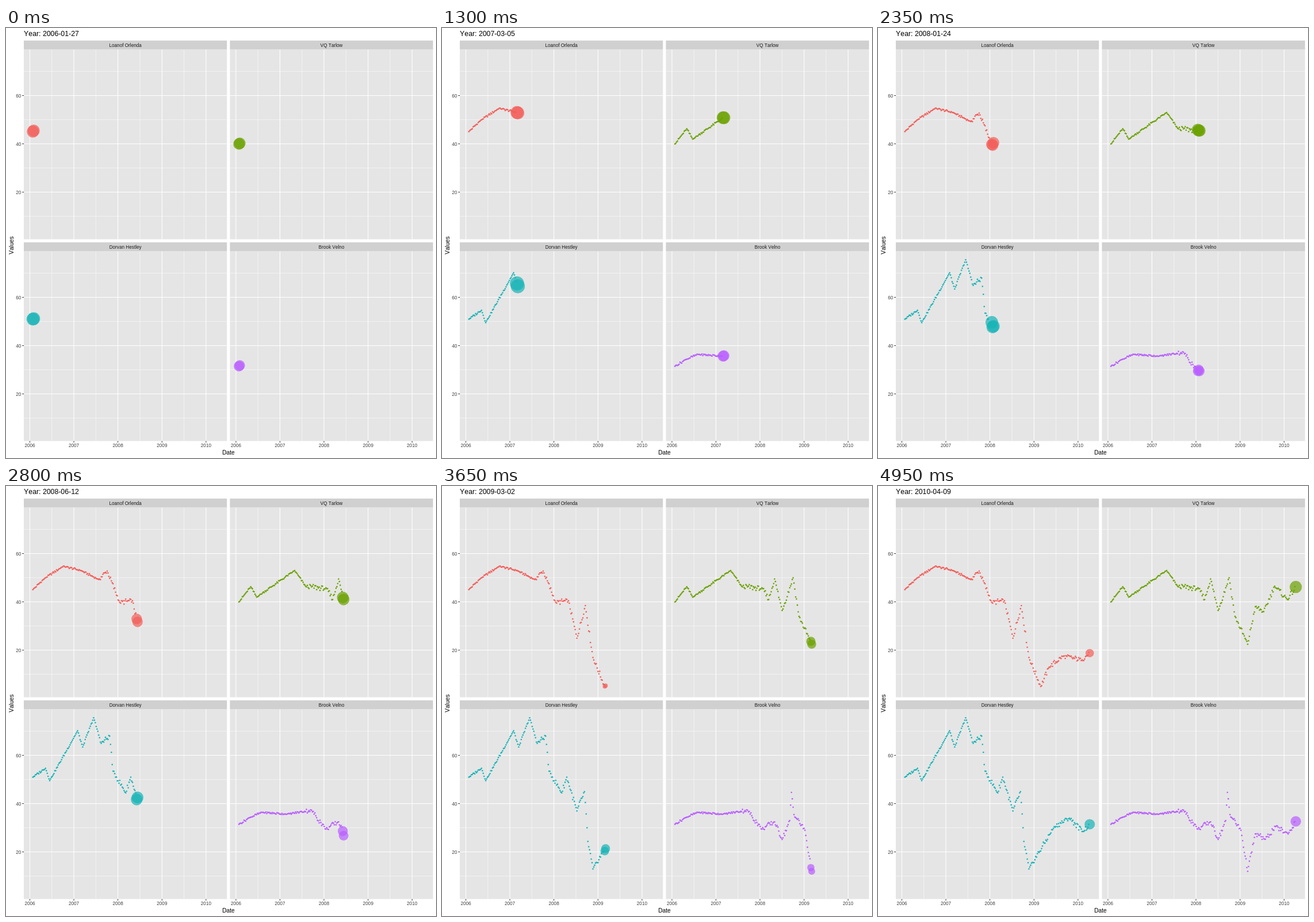
An HTML page for the animation above (5000 ms loop, 748 by 748 pixels).

```html
<!DOCTYPE html>
<html lang="en">
<head>
<meta charset="utf-8">
<title>Weekly values</title>
<style>
  html, body { margin: 0; width: 100%; height: 100%; overflow: hidden; background: #fff; }
  svg { display: block; width: 748px; height: 748px; }
  text { font: 8.2px "Liberation Sans", Arial, sans-serif; font-kerning: none; fill: #404040; }
  .title { font-size: 12.3px; fill: #000; }
  .axis { font-size: 10.25px; fill: #000; }
  .strip { fill: #1a1a1a; }
  .mid { text-anchor: middle; }
  .end { text-anchor: end; }
</style>
</head>
<body>
<svg id="chart" viewBox="0 0 748 748"></svg>
<script>
const FRAMES = 100, STEP = 50, WEEKS = 219, DAYS = 1533;
const START = Date.UTC(2006, 0, 27), DAY = 864e5;
const PX_DAY = 0.20974, COL = 358.5, ROW = 351;
const LOW = 4, HIGH = 75.6;
const chart = document.getElementById('chart');
const points = [];

function add(tag, attrs, text) {
  const el = document.createElementNS('http://www.w3.org/2000/svg', tag);
  for (const key in attrs) el.setAttribute(key, attrs[key]);
  if (text) el.textContent = text;
  return chart.appendChild(el);
}
const rect = (x, y, width, height, fill) => add('rect', { x, y, width, height, fill });
const line = (x1, y1, x2, y2, stroke, w) =>
  add('line', { x1, y1, x2, y2, stroke, 'stroke-width': w });
const label = (x, y, text, cls) => add('text', { x, y, class: cls }, text);

const dayX = day => 46.95 + day * PX_DAY;
const yearX = year => dayX((Date.UTC(year, 0, 1) - START) / DAY);
const valueY = v => 369.5 - 4.2 * v;
const radius = v => 2.4 + 10.67 * Math.sqrt(Math.max(0, v - LOW) / (HIGH - LOW));

// The last holiday Friday is quoted one day early.
const weekDay = k => k * 7 - (k === WEEKS - 1 ? 1 : 0);

// Seeded weekly noise; the market turns rougher after mid 2007.
function jitter(k, seed) {
  const s = Math.sin(k * 12.9898 + seed * 78.233) * 43758.5453;
  return (s - Math.floor(s) - 0.5) * (k < 80 ? 0.9 : 2.4);
}

// Straight trend between turning points, with noise that vanishes at each turn.
function valueAt(turns, k, seed) {
  const i = Math.max(1, turns.findIndex(([week]) => week >= k));
  const [k0, v0] = turns[i - 1], [k1, v1] = turns[i];
  const t = (k - k0) / (k1 - k0);
  return v0 + (v1 - v0) * t + jitter(k, seed) * Math.sqrt(Math.sin(Math.PI * t));
}

function panel(col, row, name, color, turns) {
  const x = 31 + col * COL, y = 37.6 + row * ROW, w = 353.3, h = 329.9;
  rect(x, y - 15.8, w, 15.8, '#d0d0d0');
  rect(x, y, w, h, '#e5e5e5');
  label(x + w / 2, y - 4.6, name, 'strip mid');
  const hLine = (v, size) => line(x, valueY(v) + row * ROW, x + w, valueY(v) + row * ROW, '#fff', size);
  const vLine = (px, size) => line(px + col * COL, y, px + col * COL, y + h, '#fff', size);
  for (let v = 10; v <= 70; v += 20) hLine(v, 0.53);
  for (let n = 2006; n < 2010; n++) vLine((yearX(n) + yearX(n + 1)) / 2, 0.53);
  for (let v = 20; v <= 60; v += 20) {
    hLine(v, 1.07);
    if (col) continue;
    const py = valueY(v) + row * ROW;
    line(28.2, py, 31, py, '#333', 1.07);
    label(26.3, py + 3, v, 'end');
  }
  for (let n = 2006; n <= 2010; n++) {
    vLine(yearX(n), 1.07);
    if (!row) continue;
    const px = yearX(n) + col * COL;
    line(px, y + h, px, y + h + 2.8, '#333', 1.07);
    label(px, 729.4, n, 'mid');
  }
  for (let k = 0; k <= WEEKS; k++) {
    const v = valueAt(turns, k, col + row * 2 + 1), day = weekDay(k);
    const el = add('circle', {
      cx: dayX(day) + col * COL - 0.2, cy: valueY(v) + row * ROW + 0.2, fill: color
    });
    points.push({ el, r: radius(v), at: Math.round(day / DAYS * (FRAMES - 1)) });
  }
}

rect(0, 0, 748, 748, '#fff');

// Turning points: [week, value]
panel(0, 0, 'Loanof Orlenda', '#f35e5a', [
  [0, 45.1], [14, 49.8], [36, 54.8], [57, 53], [78, 49.3], [88, 52.8], [103, 39.8], [118, 40.5],
  [128, 25], [138, 38.5], [147, 17], [161, 5], [171, 13], [187, 17.5], [210, 16], [219, 18.8]
]);
panel(1, 0, 'VQ Tarlow', '#6ba100', [
  [0, 40], [14, 46.3], [21, 42], [66, 53], [79, 46.5], [104, 45.5], [111, 41], [118, 49.5],
  [127, 36.5], [140, 50], [147, 34], [162, 22.5], [171, 38], [181, 36], [194, 46.5], [209, 41], [219, 46.2]
]);
panel(0, 1, 'Dorvan Hestley', '#17b3b7', [
  [0, 51], [15, 54.7], [20, 49.6], [53, 70.2], [59, 63.5], [72, 75.6], [81, 65], [91, 68],
  [95, 53.5], [110, 44.5], [116, 51], [128, 37], [137, 45], [141, 24.4], [147, 13], [177, 30.5],
  [195, 34], [211, 28.5], [219, 31.5]
]);
panel(1, 1, 'Brook Velno', '#b95eff', [
  [0, 31.5], [13, 34.3], [27, 36.4], [57, 35.7], [86, 37.3], [103, 29.5], [118, 32.5], [127, 25.2],
  [136, 33], [138, 44.7], [141, 35.5], [154, 29], [162, 12], [171, 27.5], [183, 25.3], [195, 30.5],
  [210, 27.5], [219, 32.7]
]);

const title = label(31.1, 14, 'Year: 2006-01-27', 'title');
label(387, 741.5, 'Date', 'axis mid');
label(0, 0, 'Values', 'axis mid').setAttribute('transform', 'translate(12.6 378) rotate(-90)');

function show(frame) {
  const day = Math.floor(frame * DAYS / (FRAMES - 1));
  title.textContent = 'Year: ' + new Date(START + day * DAY).toISOString().slice(0, 10);
  for (const { el, r, at } of points) {
    const current = at === frame;
    el.setAttribute('visibility', at <= frame ? 'visible' : 'hidden');
    el.setAttribute('r', current ? r : 1.3);
    el.setAttribute('fill-opacity', current ? 0.7 : 1);
  }
}

const begin = performance.now();
let last = -1;
function tick() {
  const frame = Math.floor((performance.now() - begin) / STEP) % FRAMES;
  if (frame !== last) show(last = frame);
  requestAnimationFrame(tick);
}
tick();
</script>
</body>
</html>
```
